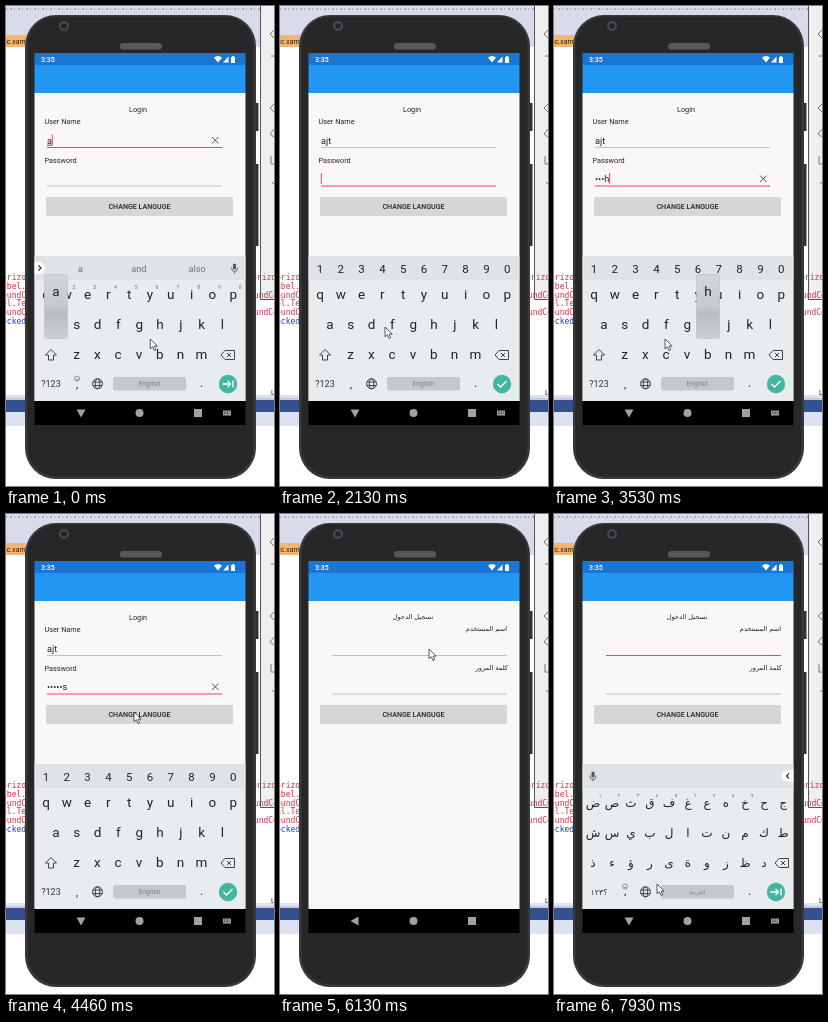
An HTML page that plays this animation: 268x480 px, repeating every 8000 ms.

```html
<!DOCTYPE html>
<html lang="en">
<head>
<meta charset="utf-8">
<title>Login screen</title>
<style>
html, body { margin: 0; width: 100%; height: 100%; overflow: hidden; background: #fff; }
svg { display: block; width: 100%; height: 100%; }
text { font-family: Roboto, "DejaVu Sans", sans-serif; fill: #222; white-space: pre; }
.code text { font: 8px "DejaVu Sans Mono", monospace; fill: #e02c44; }
.ar { font-family: "DejaVu Sans", sans-serif; direction: rtl; }
.mid { text-anchor: middle; }
</style>
</head>
<body>
<svg viewBox="0 0 268 480">
  <defs>
    <linearGradient id="pop" x2="0" y2="1">
      <stop offset="0" stop-color="#d3d6d9"/><stop offset=".5" stop-color="#c6cacc"/>
      <stop offset=".6" stop-color="#b9bdc0"/><stop offset="1" stop-color="#cbcfd1"/>
    </linearGradient>
    <clipPath id="screen"><path d="M28.5 47H239.5V395H28.5z"/></clipPath>
  </defs>
  <!-- desktop -->
  <path fill="#d8dcea" d="M0 0H268V41H0z"/>
  <path stroke="#a9aec2" stroke-width="2" stroke-dasharray="1 3 2 2" d="M0 3H268"/>
  <path fill="#f5b56c" d="M0 29H20V41H0z"/>
  <text x="-1" y="38" font-size="7">ic.xam</text>
  <path fill="#fff" d="M0 42H268V388H0z"/>
  <path fill="#dbe2f2" d="M0 389H268V420H0z"/>
  <path fill="#34508f" d="M0 394H268V406H0z"/>
  <path fill="#c3cce2" d="M0 392H268V394H0z"/>
  <path fill="#efeff2" stroke="#555" d="M254.500-1H270V293.500H254.500z"/>
  <path fill="none" stroke="#777" d="M268 24l-4 4 4 4M265 50h4M268 98l-4 4 4 4M268 123l-4 5 4 3M265 150v8h4M266 176l3 3"/>
  <text x="265" y="389" font-size="7">L</text>
  <g class="code">
    <text x="-4" y="274">orizo</text><text x="-4" y="283">abel.</text>
    <text x="-4" y="292">oundCo</text><text x="-4" y="300">el.Te</text>
    <text x="-4" y="309">oundCo</text><text x="-4" y="318" style="fill:#2038d8">ocked"</text>
    <text x="246" y="274">orizo</text><text x="243" y="292">oundCo</text><text x="243" y="309">oundCo</text>
  </g>
  <!-- phone -->
  <path fill="#303033" d="M249 97h3.500v28H249zM249 158h3.500v82H249z"/>
  <rect x="19" y="9" width="231" height="464" rx="31" fill="#38383b"/>
  <rect x="21.500" y="10.500" width="226" height="460" rx="29" fill="#272729"/>
  <circle cx="58" cy="20" r="5" fill="#4a4a4d"/><circle cx="58" cy="20" r="2.800" fill="#1c2530"/>
  <rect x="114" y="37" width="42" height="6.500" rx="3.200" fill="#58585b"/>
  <path fill="#faf8f7" d="M28.500 87H239.500V395H28.500z"/>
  <path fill="#1a76d2" d="M28.500 47H239.500V59H28.500z"/>
  <path fill="#2196f3" d="M28.500 59H239.500V87H28.500z"/>
  <path fill="#000" d="M28.500 395H239.500V419H28.500z"/>
  <text x="35" y="55.800" font-size="7" font-weight="500" style="fill:#fff">3:35</text>
  <path fill="#fff" d="M208 51.500q4-3 8 0l-4 5zM217 56.500l5.500-6v6zM225 51h1v-1h2v1h1v6h-4z"/>
  <rect x="40" y="191" width="187" height="19" rx="1" fill="#d6d6d6"/>
  <text class="mid" x="133.500" y="203" font-size="7.100" font-weight="500">CHANGE LANGUGE</text>
  <g id="page"></g>
  <g id="keys" clip-path="url(#screen)"></g>
  <g id="nav" fill="#a2a2a2"></g>
  <path id="mouse" d="M0 0V9.800L2.300 7.700 4 11.500 5.700 10.700 4.100 7.100H7.200z" fill="#fff" stroke="#333" stroke-width=".8"/>
</svg>
<script>
const LOOP = 8000, PASS = 1860, ARABIC = 5060, REFOCUS = 6420, OPEN = 6560, SWITCH = 7560;
const user = [[-100, 'a'], [400, 'j'], [1330, 't']];
const pass = [[2630, 'a'], [2930, 's'], [3200, 'd'], [3440, 'h'], [3690, 'd'], [3930, 's']];
// mouse path: time, x, y
const path = [[0, 144, 333], [60, 160, 334], [260, 184, 344], [430, 192, 349], [780, 192, 349],
  [870, 122, 302], [1130, 109, 291], [1530, 106, 291], [1860, 105, 306], [2130, 105, 321],
  [3200, 105, 321], [3500, 111, 333], [3760, 111, 333], [4060, 116, 309], [4430, 128, 198],
  [5530, 128, 198], [6100, 149, 135], [6460, 149, 135], [7230, 90, 392], [7330, 89, 389],
  [7530, 90, 377], [7900, 103, 370], [LOOP, 103, 370]];
const latin = ['qwertyuiop', 'asdfghjkl', 'zxcvbnm'];
const arabic = ['ضصثقفغعهخحج', 'شسيبلاتنمكط', 'ذءؤرىةوزظد'];
const keyX = [40, 50, 70.5], rowY = [292.5, 322.5, 352.5], STEP = 20.8;

const $ = id => document.getElementById(id);
const pen = document.createElement('canvas').getContext('2d');
const text = (s, x, y, size, cls = 'mid', fill = '#222') =>
  `<text class="${cls}" x="${x}" y="${y}" font-size="${size}" style="fill:${fill}">${s}</text>`;
const shape = (d, fill) => `<path d="${d}" fill="${fill}"/>`;
const line = (d, color = '#444', w = 1) => `<path d="${d}" fill="none" stroke="${color}" stroke-width="${w}"/>`;
const disc = (x, y, r, fill) => `<circle cx="${x}" cy="${y}" r="${r}" fill="${fill}"/>`;
const typed = (list, t) => list.filter(k => k[0] <= t);
const word = list => list.map(k => k[1]).join('');
const cache = {};
const put = (id, html) => { if (cache[id] !== html) $(id).innerHTML = cache[id] = html; };

function field(s, y, focus, since, t, rtl) {
  let out = line(rtl ? `M52 ${y}H227` : `M41 ${y}H216`, focus ? '#f0407c' : '#b4b4b4', focus ? 1.2 : .8);
  out += text(s, 41, y - 4, 9.2, '');
  pen.font = '9.2px Roboto, sans-serif';
  const w = pen.measureText(s).width;
  if (focus && s) out += line(`M206 ${y - 10.500}l6.500 6.500m0-6.500l-6.500 6.500`, '#555');
  if (focus && (t - since) % 1000 < 500) {
    const x = rtl ? 226.5 : 41.3 + w;
    out += line(`M${x} ${y - 13}v11`, '#f0407c');
  }
  if (focus && s && y < 150) out += line(`M41 ${y - 2.300}h${w}`, '#222', .8);
  return out;
}

function page(t) {
  if (t >= ARABIC) return text('تسجيل الدخول', 133, 104.5, 6.6, 'ar mid') +
    text('اسم المستخدم', 227, 117, 6.6, 'ar') + text('كلمة المرور', 228, 156, 6.6, 'ar') +
    field('', 141.5, t >= REFOCUS, REFOCUS, t, true) + field('', 180, false, 0, t, true);
  const u = typed(user, t), p = typed(pass, t), last = p.at(-1);
  const hidden = last ? '•'.repeat(p.length - 1) + (t - last[0] < 1500 ? last[1] : '•') : '';
  return text('Login', 132, 105.5, 7.3) + text('User Name', 38.5, 118, 7.3, '') + text('Password', 38.5, 156.5, 7.3, '') +
    field(word(u), 141.5, t < PASS, u.at(-1)[0], t) + field(hidden, 180, t >= PASS, last ? last[0] : PASS, t);
}

function strip(t, secret) {
  if (secret) return [...'1234567890'].map((c, i) => text(c, 40 + i * STEP, 266.5, 11.5)).join('');
  const rtl = t >= ARABIC, mx = rtl ? 39 : 228.5;
  let out = shape(`M${mx - 1.500} 258.500q1.500-2 3 0v4q-1.500 2-3 0z`, '#555') +
    line(`M${mx - 3} 261.500q0 4 3 4t3-4M${mx} 265.500v2`, '#555', .9);
  if (rtl) return out + shape('M239.500 256H234a6 6 0 0 0 0 12h5.500z', '#fff') + line('M235 259.500l-2.500 2.500 2.500 2.500', '#222', 1.1);
  const hints = [['a', 'and', 'also'], ['aj', 'an', "I'm"], ['ajt', 'art', 'act']][typed(user, t).length - 1];
  return out + shape('M28.500 256H33a6 6 0 0 1 0 12h-4.500z', '#fff') + line('M32.500 259.500l2.500 2.500-2.500 2.500', '#222', 1.1) +
    hints.map((h, i) => text(h, 74.5 + i * 58.3, 265.5, 9.2, 'mid', '#6c7478')).join('');
}

function popup(t, secret) {
  const key = (secret ? pass : user).find(k => t >= k[0] && t < k[0] + 155);
  if (!key || t >= ARABIC) return '';
  const row = latin.findIndex(r => r.includes(key[1]));
  const x = keyX[row] + latin[row].indexOf(key[1]) * STEP, y = rowY[row];
  return `<rect x="${x - 11.500}" y="${y - 54}" width="23" height="64" rx="2" fill="url(#pop)" stroke="#b4b8ba" stroke-width=".5"/>` +
    text(key[1], x, y - 33, 13.5) + (secret ? '' : text('…', x + 6, y - 27, 5, 'mid', '#666'));
}

function keyboard(t) {
  const hide = t >= ARABIC && t < OPEN ? (t - ARABIC) / 200 : 0;
  const show = t >= OPEN ? Math.min(1, (t - OPEN) / 200) : 1;
  if (hide >= 1 || (t >= ARABIC + 200 && t < OPEN)) return '';
  const drop = hide * hide + (1 - show) ** 2, secret = t >= PASS && t < OPEN, ar = t >= SWITCH;
  let out = `<g transform="translate(0 ${(drop * 146).toFixed(1)})">` +
    shape('M28.500 250H239.500V395H28.500z', '#e8ecee') + shape('M28.500 250H239.500V274H28.500z', '#dfe3e6') + strip(t, secret);
  (ar ? arabic : latin).forEach((row, r) => [...row].forEach((c, i) => {
    const x = ar ? 39 + i * 19 : keyX[r] + i * STEP;
    out += text(c, x, rowY[r], ar ? 12 : 13.5, ar ? 'ar mid' : 'mid');
    if (!r && !secret && i < 10) out += text(ar ? '١٢٣٤٥٦٧٨٩٠'[i] : (i + 1) % 10, x + 7, 282.5, 5, 'mid', '#666');
  }));
  const bx = ar ? 228 : 222;
  if (!ar) out += line('M45 343.500l-5.500 5.500h3v5h5v-5h3z');
  out += line(`M${bx - 7} 349l4-4.500h9.500v9h-9.500zM${bx - 1} 347l4 4m0-4l-4 4`) +
    text(ar ? '؟١٢٣' : '?123', 45, 381, ar ? 8 : 9, ar ? 'ar mid' : 'mid', '#333') +
    text(ar ? '،' : ',', 71, 381.5, 11);
  if (!secret) out += `<circle cx="71" cy="372.500" r="2.500" fill="none" stroke="#555" stroke-width=".6"/>` + line('M69.700 373q1.300 1.500 2.600 0', '#555', .6);
  out += `<g fill="none" stroke="#333" stroke-width=".9"><circle cx="91.500" cy="377.800" r="5"/><ellipse cx="91.500" cy="377.800" rx="2.200" ry="5"/><path d="M87 376H96M87 379.600H96"/></g>` +
    `<rect x="107" y="371" width="73" height="13.500" rx="2" fill="#c4c8ca"/>` +
    text(ar ? 'العربية' : 'English', 143.5, 380.2, ar ? 5.8 : 6.8, ar ? 'ar mid' : 'mid', '#7e8588') +
    text('.', 195.5, 381, 12) + disc(222, 378, 9.2, '#45b5a0') +
    line(secret ? 'M217.500 378l3 3 6-6' : 'M216.500 378h8m-3-3l3 3-3 3M227 374.500v7', '#fff', 1.3);
  return out + popup(t, secret) + '</g>';
}

function nav(t) {
  const open = t < ARABIC + 130 || t >= OPEN;
  return `<path d="${open ? 'M70.500 403.500h9l-4.500 8z' : 'M78.500 402.500v9l-8-4.500z'}"/><circle cx="133.500" cy="407" r="4"/><path d="M188 403h8v8h-8z"/>` +
    (open ? '<path d="M217 404.500h8v5h-8z"/><path stroke="#000" stroke-width=".7" stroke-dasharray=".8" d="M218 406h6M218 407.500h6"/>' : '');
}

function mouse(t) {
  const i = path.findIndex(p => p[0] > t), [t0, x0, y0] = path[i - 1], [t1, x1, y1] = path[i];
  const k = (t - t0) / (t1 - t0);
  $('mouse').setAttribute('transform', `translate(${x0 + (x1 - x0) * k} ${y0 + (y1 - y0) * k})`);
}

const start = performance.now();
function frame(now) {
  const t = Math.max(0, now - start) % LOOP;
  put('page', page(t));
  put('keys', keyboard(t));
  put('nav', nav(t));
  mouse(t);
  requestAnimationFrame(frame);
}
frame(start);
</script>
</body>
</html>
```
